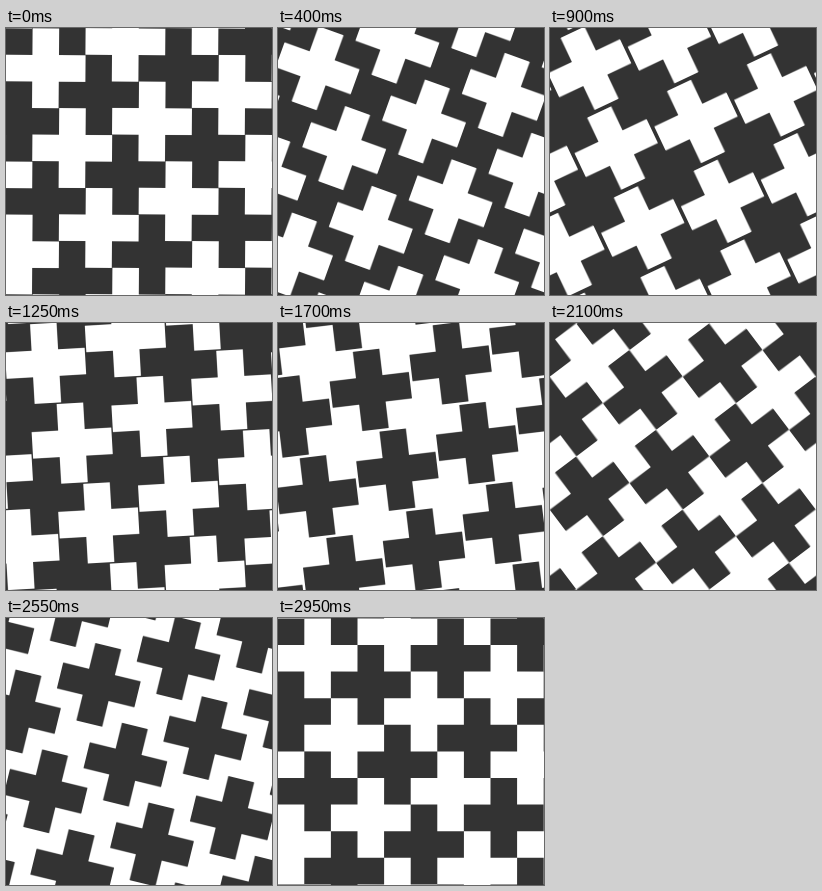
An HTML page with a canvas for the animation above (3000 ms loop, 266 px wide and 267 px high).

```html
<!DOCTYPE html>
<html>
<head>
<meta charset="utf-8">
<title>Turning crosses</title>
<style>
  html, body { margin: 0; width: 100%; height: 100%; overflow: hidden; }
  canvas { display: block; }
</style>
</head>
<body>
<canvas id="stage" width="266" height="267"></canvas>
<script>
const ctx = document.getElementById('stage').getContext('2d');
const DARK = '#333', LIGHT = '#fff';
const CELL = 26.6, LEFT = -.3, TOP = .4;
const HALF = 1500, LEAD = 50, SHUTTER = 30, SAMPLES = 6;

// One plus sign, three cells across, as a single outline
const plus = new Path2D();
for (let k = 0; k < 4; k++) {
  const c = [1, 0, -1, 0][k], s = [0, 1, 0, -1][k];
  for (const [x, y] of [[-.5, -.5], [-.5, -1.5], [.5, -1.5]]) {
    plus.lineTo((x * c - y * s) * CELL, (x * s + y * c) * CELL);
  }
}
plus.closePath();

// Light and dark plus signs tile the plane; residue picks one of the two sets
function setPath(residue, angle) {
  const path = new Path2D();
  for (let y = -2; y <= 12; y++) {
    for (let x = -2; x <= 12; x++) {
      if ((3 * x - y + 100) % 10 !== residue) continue;
      const place = new DOMMatrix()
        .translate(LEFT + (x + .5) * CELL, TOP + (y + .5) * CELL)
        .rotate(angle);
      path.addPath(plus, place);
    }
  }
  return path;
}

const layer = document.createElement('canvas');
layer.width = 266;
layer.height = 267;
const pen = layer.getContext('2d');

function drawSample(ms) {
  const t = ms % (2 * HALF), first = t < HALF;
  const angle = 45 * (1 - Math.cos(Math.PI * (t % HALF) / HALF));
  pen.fillStyle = first ? DARK : LIGHT;
  pen.fillRect(0, 0, 266, 267);
  pen.fillStyle = first ? LIGHT : DARK;
  pen.fill(first ? setPath(2, angle) : setPath(7, -angle));
}

// Motion blur: running average of samples over the open shutter
function draw(ms) {
  for (let i = 0; i < SAMPLES; i++) {
    drawSample(ms + LEAD + SHUTTER * (i + .5) / SAMPLES);
    ctx.globalAlpha = 1 / (i + 1);
    ctx.drawImage(layer, 0, 0);
  }
}

const start = performance.now();
function tick() {
  draw(performance.now() - start);
  requestAnimationFrame(tick);
}
tick();
</script>
</body>
</html>
```
